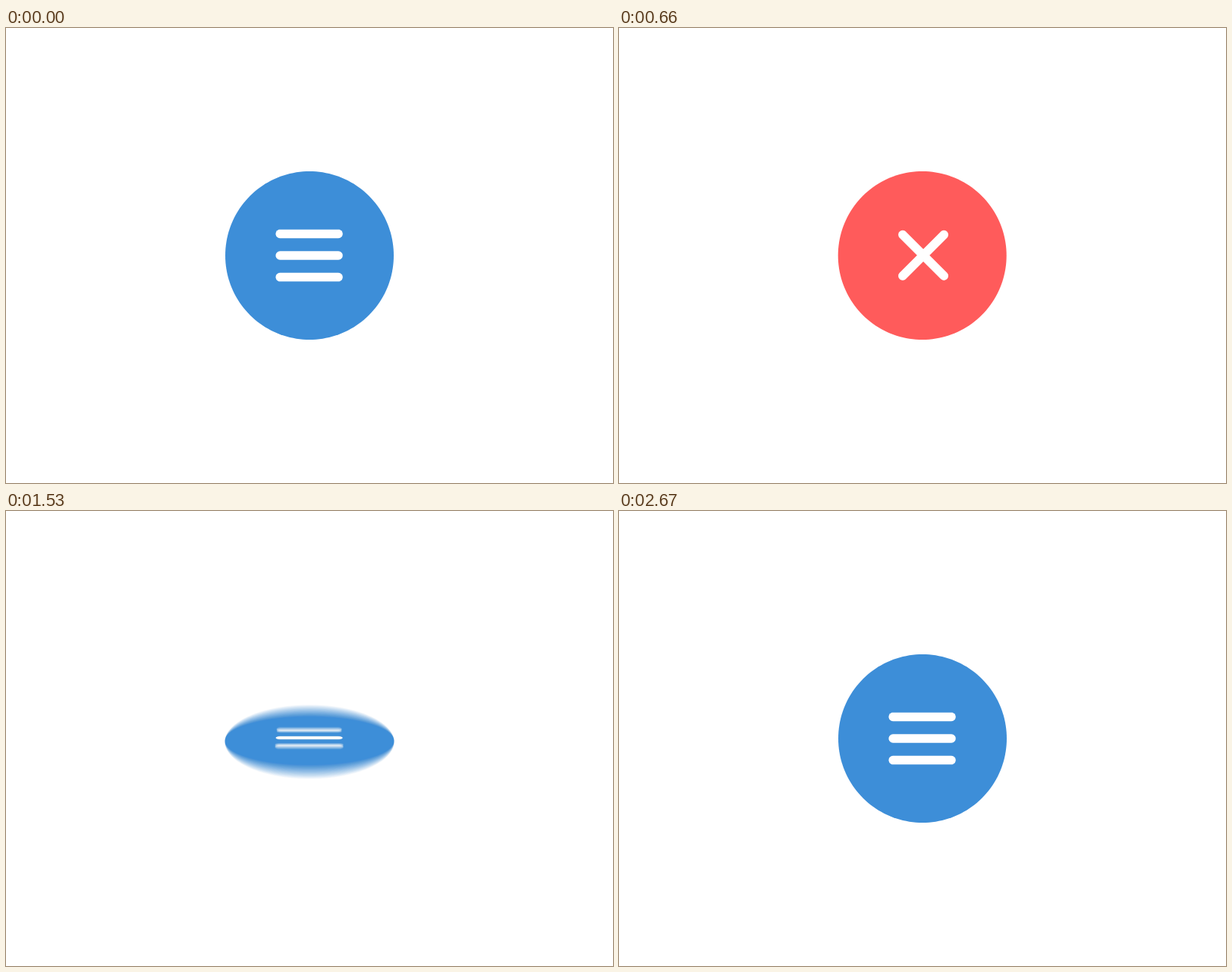
An HTML page with a canvas that plays this animation: 800 px wide and 600 px high, repeating every 2.7 s.

```html
<!DOCTYPE html>
<html lang="en">
<head>
<meta charset="utf-8">
<title>Menu toggle</title>
<style>
  html, body { margin: 0; width: 100%; height: 100%; overflow: hidden; background: #fff; }
  canvas { display: block; width: 800px; height: 600px; }
</style>
</head>
<body>
<canvas id="stage" width="800" height="600"></canvas>
<script>
const W = 800, H = 600, LOOP = 2700, STEP = 30;
const SHUTTER = 15, SAMPLES = 24;
const CAMERA = 1111, RADIUS = 111;
const BLUE = '#3d8ed8', RED = '#ff5b5b';
const FLIPS = [
  { start: 10, sideways: true, from: 'menu', to: 'close' },
  { start: 1330, sideways: false, from: 'close', to: 'menu' }
];
// time (ms), angle (deg), speed (deg per ms)
const SWING = [
  [0, 0, 0], [80, 31.5, 0.5], [200, 111, 0.68], [380, 206, 0],
  [500, 185, -0.17], [580, 176, 0], [720, 181, 0], [840, 180, 0]
];

const view = document.getElementById('stage').getContext('2d');
const layer = document.createElement('canvas');
layer.width = W;
layer.height = H;
const ctx = layer.getContext('2d');

function arc(cx, cy, r, from, to, n) {
  return Array.from({ length: n + 1 }, (_, i) => {
    const a = from + (to - from) * i / n;
    return [cx + r * Math.cos(a), cy + r * Math.sin(a)];
  });
}

function bar(cx, cy, turn) {
  const half = 38.3, r = 5.8, q = Math.PI / 2;
  const dx = half * Math.cos(turn), dy = half * Math.sin(turn);
  return [
    ...arc(cx + dx, cy + dy, r, turn - q, turn + q, 12),
    ...arc(cx - dx, cy - dy, r, turn + q, turn + 3 * q, 12)
  ];
}

const disc = arc(0, 0, RADIUS, 0, 2 * Math.PI, 160);
const FACES = {
  menu: { color: BLUE, lift: 1, bars: [-28.5, 0, 28.5].map(y => bar(-0.4, y, 0)) },
  close: { color: RED, lift: 3, bars: [1, -1].map(s => bar(1, -0.3, s * Math.PI / 4)) }
};

function swing(t) {
  const last = SWING[SWING.length - 1];
  if (t <= 0) return 0;
  if (t >= last[0]) return last[1];
  const i = SWING.findIndex(k => k[0] > t);
  const [t0, a0, v0] = SWING[i - 1], [t1, a1, v1] = SWING[i];
  const d = t1 - t0, u = (t - t0) / d, u2 = u * u, u3 = u2 * u;
  return a0 + (a1 - a0) * (3 * u2 - 2 * u3)
    + d * (v0 * (u3 - 2 * u2 + u) + v1 * (u3 - u2));
}

function fill(points, z, tilt, sideways, color) {
  const c = Math.cos(tilt), s = Math.sin(tilt);
  ctx.beginPath();
  for (const [x, y] of points) {
    const u = sideways ? x : -y;
    const k = CAMERA / (CAMERA - u * s - z * c);
    const moved = (u * c - z * s) * k;
    if (sideways) ctx.lineTo(W / 2 + moved, H / 2 + y * k);
    else ctx.lineTo(W / 2 + x * k, H / 2 - moved);
  }
  ctx.closePath();
  ctx.fillStyle = color;
  ctx.fill();
}

function drawPose(t) {
  const flip = t < FLIPS[1].start ? FLIPS[0] : FLIPS[1];
  const angle = swing(t - flip.start);
  const turned = angle > 90;
  const face = FACES[turned ? flip.to : flip.from];
  const tilt = (turned ? angle - 180 : angle) * Math.PI / 180;
  ctx.fillStyle = '#fff';
  ctx.fillRect(0, 0, W, H);
  fill(disc, 0, tilt, flip.sideways, face.color);
  for (const b of face.bars) fill(b, face.lift, tilt, flip.sideways, '#fff');
}

// Averages several poses across the open shutter.
function render(t) {
  for (let i = 0; i < SAMPLES; i++) {
    drawPose(t + ((i + 0.5) / SAMPLES - 0.5) * SHUTTER);
    view.globalAlpha = 1 / (i + 1);
    view.drawImage(layer, 0, 0);
  }
}

const began = performance.now();
let shown = -1;
function tick() {
  const t = (performance.now() - began + 1) % LOOP;
  const now = Math.floor(t / STEP) * STEP;
  if (now !== shown) render(shown = now);
  requestAnimationFrame(tick);
}
tick();
</script>
</body>
</html>
```
